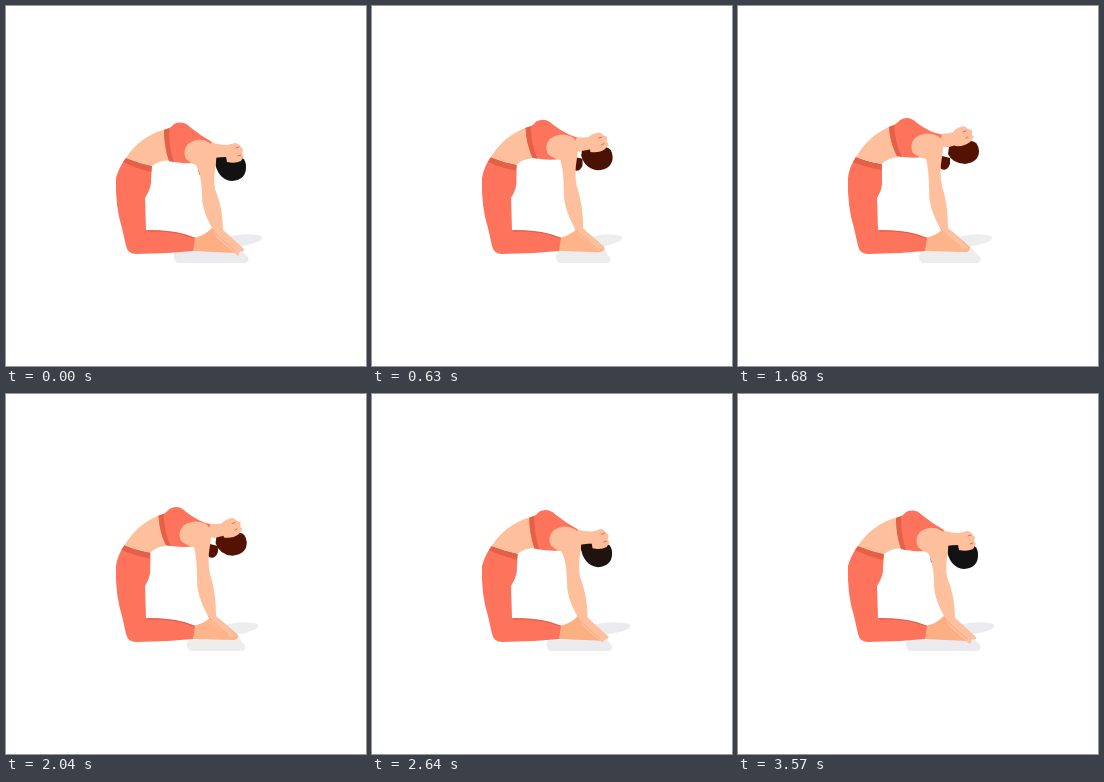
Animation, 360 px wide and 360 px high, one loop 3.6 s. Source, as an HTML page:

```html
<!DOCTYPE html>
<html lang="en">
<head>
<meta charset="utf-8">
<title>Camel pose</title>
<style>
html, body { margin: 0; width: 100%; height: 100%; overflow: hidden; background: #fff; }
svg { display: block; width: 100vw; height: 100vh; }
</style>
</head>
<body>
<svg id="stage" viewBox="0 0 360 360"></svg>
<script>
const LOOP = 3600;
const stage = document.getElementById('stage');

const tones = {
  red: [[254, 115, 92], [254, 115, 92]],
  deep: [[228, 97, 72], [228, 97, 72]],
  skin: [[254, 192, 156], [254, 192, 156]],
  foot: [[253, 174, 131], [254, 180, 138]],
  shade: [[246, 160, 118], [246, 160, 118]],
  hair: [[18, 18, 18], [84, 18, 2]]
};

// tone, low pose, high pose, optional: stroke width, early mover
const parts = [
  ['hair', 'M197 156Q191 160 193 168Q199 173 203 167L203 156Z',
           'M204 150Q199 157 203 163Q209 166 212 158Q212 152 207 148Z', 0, true],
  ['foot', 'M186 232Q197 231 206 222Q213 222 219 228L234 242Q236 246 230 247L186 245Z',
           'M186 232Q196 231 205 223Q211 222 217 228L231 240Q234 244 228 246L186 245Z', 0, true],
  ['red', 'M120 152Q113 161 110 172Q109 200 116 222L120 240Q122 248 130 248Q159 248 187 245L189 232Q169 224 140 224L139 192Q146 181 145 173L146 160Q133 157 120 152Z',
          'M118 151Q111 161 110 172Q109 200 116 222L120 240Q122 248 130 248Q159 248 187 245L189 232Q169 224 140 224L139 192Q145 182 144 174L144 159Q131 157 118 151Z'],
  ['deep', 'M120 152Q132 157 146 160L145 166Q129 162 117 156Z',
           'M118 151Q130 156 144 158L143 164Q127 161 115 156Z'],
  ['deep', 'M142 225Q169 224 188 232', 'M142 225Q169 224 188 232', 1.3],
  ['skin', 'M120 152Q134 130 160 123L166 154Q153 154 146 160Q132 157 120 152Z',
           'M118 151Q131 129 153 120L161 151Q149 152 144 158Q130 156 118 151Z'],
  ['skin', 'M195 131Q207 139 221 139L224 155Q211 154 205 151Z',
           'M190 125Q203 130 217 126L219 141Q207 141 200 141Z'],
  ['hair', 'M208 152Q211 174 226 175Q240 174 240 161Q240 154 236 152Q220 150 208 152Z',
           'M210 148Q214 157 227 158Q241 156 241 145Q240 135 233 135Q222 138 211 141Z'],
  ['skin', 'M218 140Q224 138 226 138Q231 135 234 140L237 143L236 148L238 150L235 155Q229 158 221 156Z',
           'M215 126Q218 122 222 121Q227 119 230 123L234 124L234 129L236 131L232 136Q226 141 217 140Z'],
  ['deep', 'M230 142l3 -1M232 150l3 -1', 'M225 126l3 -1M228 132l2 -1', 0.9],
  ['red', 'M158 124Q164 123 168 118Q177 114 184 121Q195 130 206 136L199 154Q189 160 163 155Q158 140 158 124Z',
          'M151 121Q158 119 162 114Q171 109 179 117Q191 126 204 129L196 149Q179 154 159 150Q152 137 151 121Z'],
  ['deep', 'M158 124L163 122Q163 142 168 156L163 155Q158 140 158 124Z',
           'M151 121L156 119Q157 138 164 151L159 150Q152 137 151 121Z'],
  ['skin', 'M180 153Q176 145 182 138Q193 130 204 137Q212 142 210 157Q207 174 209 183Q217 202 217 224L226 232L238 243Q239 246 234 245L232 250L226 245L211 232L206 222Q195 203 196 187Q195 167 190 159Q184 157 180 153Z',
           'M175 147Q171 139 177 132Q188 124 200 130Q207 135 204 151Q201 167 204 180Q210 198 210 222L217 229L230 241Q231 243 228 242L226 244L218 238L207 230L202 222Q190 201 191 184Q191 164 188 153Q180 151 175 147Z', 0, true],
  ['shade', 'M206 223Q211 230 220 237L229 245', 'M202 222Q207 229 215 235L222 240', 0.7, true]
];

const mix = (a, b, p) => a + (b - a) * p;
const clamp = x => Math.max(0, Math.min(1, x));
const ease = x => { x = clamp(x); return x * x * (3 - 2 * x); };
// rises during a..b, falls during c..d
const swell = (t, a, b, c, d) => ease((t - a) / (b - a)) - ease((t - c) / (d - c));

function track(keys, t) {
  let i = 1;
  while (i < keys.length - 1 && t > keys[i][0]) i++;
  const [t0, v0] = keys[i - 1], [t1, v1] = keys[i];
  return mix(v0, v1, ease((t - t0) / (t1 - t0)));
}

function tint(name, p) {
  const [a, b] = tones[name];
  return `rgb(${a.map((v, i) => Math.round(mix(v, b[i], p)))})`;
}

function blend(a, b, p) {
  const ends = b.match(/-?[\d.]+/g);
  let i = 0;
  return a.replace(/-?[\d.]+/g, n => mix(+n, +ends[i++], p).toFixed(2));
}

function addPath() {
  const el = document.createElementNS('http://www.w3.org/2000/svg', 'path');
  stage.appendChild(el);
  return el;
}

const shadow = addPath();
const views = parts.map(([, , , width]) => {
  const el = addPath();
  if (width) {
    el.setAttribute('fill', 'none');
    el.setAttribute('stroke-width', width);
    el.setAttribute('stroke-linecap', 'round');
  }
  return el;
});

const leftEdge = [[0, 167], [630, 183], [1050, 178], [1680, 180], [2280, 180], [3000, 167], [LOOP, 167]];
const baseEdge = [[0, 243], [630, 239], [1050, 243], [1680, 243], [2280, 238], [3000, 243], [LOOP, 243]];
const tipEdge = [[0, 257], [280, 272], [630, 251], [1050, 256], [1680, 255], [2280, 252], [2840, 262], [3050, 257], [LOOP, 257]];

function drawShadow(t, q) {
  const l = track(leftEdge, t), r = track(baseEdge, t), e = track(tipEdge, t);
  shadow.setAttribute('d', `M${l + 3} 246Q${l - 2} 251 ${l + 4} 257L${r - 3} 257Q${r + 3} 254 ${r - 4} 248` +
    `L232 240Q${e - 15} 240 ${e - 3} 235Q${e + 3} 230 ${e - 7} 229Q${e - 20} 227 220 231L210 245Z`);
  shadow.setAttribute('fill', `rgb(${[235, 234, 239].map(v => Math.round(mix(v, 237, q)))})`);
}

function draw(now) {
  const t = now % LOOP;
  const pose = swell(t, 0, 1080, 1670, 2890);
  const lead = swell(t, 0, 850, 2000, 2900);
  drawShadow(t, lead);
  parts.forEach(([tone, low, high, width, early], i) => {
    views[i].setAttribute('d', blend(low, high, early ? lead : pose));
    views[i].setAttribute(width ? 'stroke' : 'fill', tint(tone, lead));
  });
}

const start = performance.now();
function tick() {
  draw(performance.now() - start);
  requestAnimationFrame(tick);
}
tick();
</script>
</body>
</html>
```
